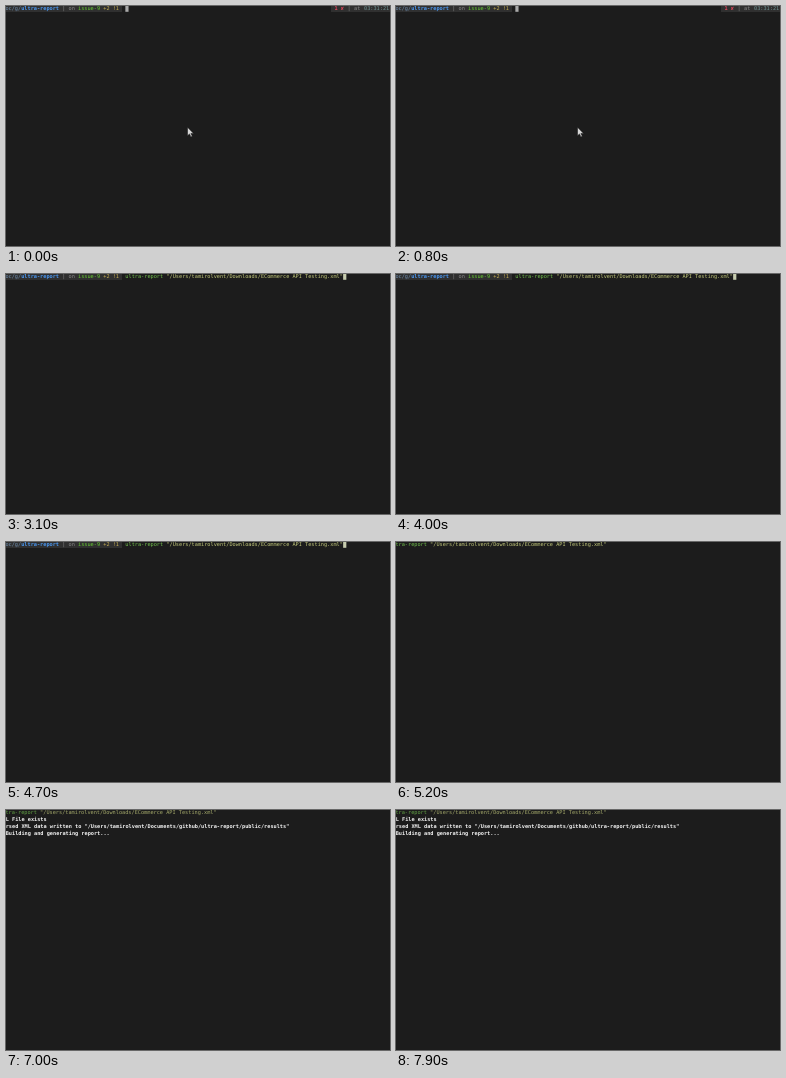
An HTML page for the animation above (8 s loop, 384 by 240 pixels).

```html
<!DOCTYPE html>
<html lang="en">
<head>
<meta charset="utf-8">
<title>Terminal report run</title>
<style>
  html, body { margin: 0; width: 100%; height: 100%; overflow: hidden; background: #1c1c1c; }
  svg { display: block; width: 100vw; height: 100vh; }
  text {
    font: 5.243px "DejaVu Sans Mono", "Liberation Mono", monospace;
    text-rendering: geometricPrecision;
    white-space: pre;
  }
  .bar { fill: #303030; }
  .grey { fill: #8a8a8a; }
  .dir { fill: #6f8fb0; }
  .anchor { fill: #4a97f0; font-weight: bold; }
  .git { fill: #66cc33; }
  .dirty { fill: #c9b055; }
  .error { fill: #e0445c; font-weight: bold; }
  .clock { fill: #6f9494; }
  .cmd { fill: #72c04e; }
  .arg { fill: #c3c97c; }
  .hint { fill: #858585; }
  .out { fill: #f4f4f4; font-weight: bold; }
  .caret { fill: #a9a9a9; }
</style>
</head>
<body>
<svg viewBox="0 0 384 240" preserveAspectRatio="none">
  <rect width="384" height="240" fill="#1c1c1c"/>
  <g id="prompt">
    <rect class="bar" width="116" height="6"/>
    <g id="segments"></g>
  </g>
  <g id="idle">
    <rect class="bar" x="325" width="59" height="6"/>
    <g id="status"></g>
    <path d="M181.5 121.3v8.4l2-1.8 1.4 3 1.4-.6-1.4-2.9h2.7z"
          fill="#d8d8d8" stroke="#111" stroke-width=".5"/>
  </g>
  <g id="line"></g>
  <rect id="caret" class="caret" width="3.2" height="5.8"/>
  <g id="output"></g>
</svg>
<script>
  const LOOP = 8000, TYPE = 1000, KEY = 85, ACCEPT = 3000, ENTER = 4900, RESULT = 5400;
  const CELL = 3.1565, LEFT = -0.6, ROW = 6.77, BASE = 4.4, CMD_COL = 38;
  const COMMAND = "ultra-report ";
  const USER = "/Users/tamirolvent";
  const ARGUMENT = `"${USER}/Downloads/ECommerce API Testing.xml"`;
  const $ = id => document.getElementById(id);
  const colX = col => LEFT + col * CELL;

  function addText(parent, cls, x, row, content = "") {
    const el = document.createElementNS("http://www.w3.org/2000/svg", "text");
    el.setAttribute("class", cls);
    el.setAttribute("x", x);
    el.setAttribute("y", BASE + row * ROW);
    el.textContent = content;
    $(parent).append(el);
    return el;
  }

  [
    ["dir", 0, "oc/g/"], ["anchor", 5, "ultra-report"], ["grey", 18, "|"], ["grey", 20, "on"],
    ["git", 23, "issue-9"], ["dirty", 31, "+2"], ["dirty", 34, "!1"]
  ].forEach(([cls, col, s]) => addText("segments", cls, colX(col), 0, s));

  [
    ["error", 328.5, "1 ✘"], ["grey", 341.5, "|"], ["grey", 348, "at"], ["clock", 358, "03:31:21"]
  ].forEach(([cls, x, s]) => addText("status", cls, x, 0, s));

  [
    "L File exists",
    `rsed XML data written to "${USER}/Documents/github/ultra-report/public/results"`,
    "Building and generating report..."
  ].forEach((s, i) => addText("output", "out", -0.3, i + 1, s));

  const cmd = addText("line", "cmd", 0, 0);
  const hint = addText("line", "hint", 0, 0);
  const arg = addText("line", "arg", 0, 0, ARGUMENT);

  const show = (el, on) => el.setAttribute("visibility", on ? "visible" : "hidden");

  function render(t) {
    const typing = t >= TYPE, accepted = t >= ACCEPT, entered = t >= ENTER;
    const count = typing ? Math.min(COMMAND.length, 1 + Math.floor((t - TYPE) / KEY)) : 0;
    const start = entered ? -2 : CMD_COL;
    const caretCol = CMD_COL + count + (accepted ? ARGUMENT.length : 0);

    show($("prompt"), !entered);
    show($("idle"), !typing);
    show($("caret"), !entered);
    show($("output"), t >= RESULT);
    show(hint, typing && !accepted);
    show(arg, accepted);

    // The caret hides the first suggested character.
    cmd.textContent = COMMAND.slice(0, count);
    hint.textContent = (COMMAND + ARGUMENT).slice(count + 1);
    cmd.setAttribute("x", colX(start));
    hint.setAttribute("x", colX(start + count + 1));
    arg.setAttribute("x", colX(start + COMMAND.length));
    $("caret").setAttribute("x", colX(caretCol));
    $("caret").style.fill = accepted ? "#c6cbae" : "";
    $("line").setAttribute("opacity", t >= RESULT ? 0.82 : 1);
  }

  function tick() {
    render(performance.now() % LOOP);
    requestAnimationFrame(tick);
  }
  tick();
</script>
</body>
</html>
```
